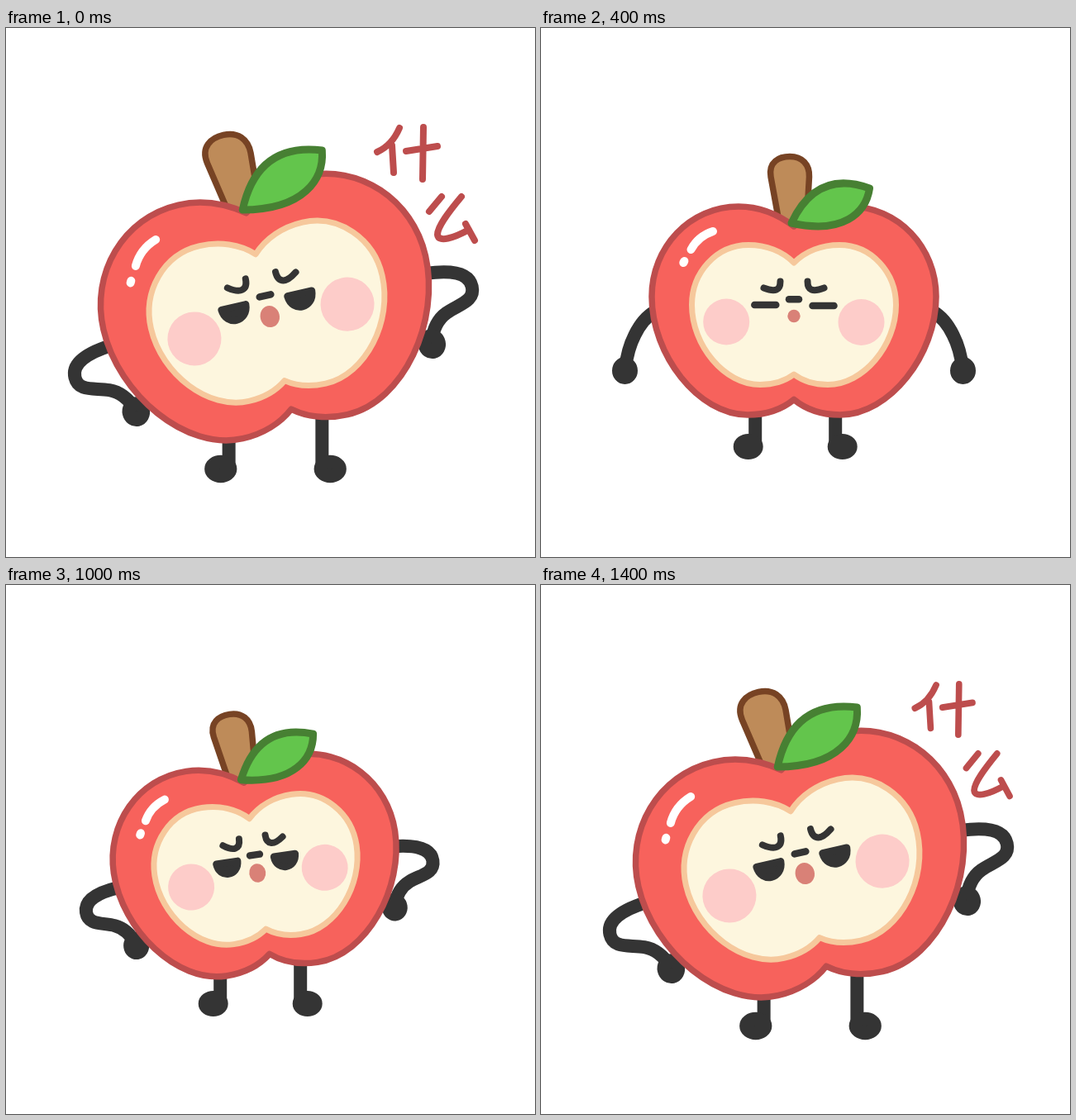
Animation of 640 by 640 pixels, one loop 1600 ms. Source, as an HTML page with a canvas:

```html
<!DOCTYPE html>
<html lang="zh">
<head>
<meta charset="utf-8">
<style>
  html, body { margin: 0; width: 100%; height: 100%; overflow: hidden; background: #fff; }
  canvas { display: block; width: 100vmin; height: 100vmin; }
</style>
</head>
<body>
<canvas id="stage" width="640" height="640"></canvas>
<script>
const ctx = document.getElementById('stage').getContext('2d');
const LOOP = 1600;
const INK = '#343434', RED = '#f7625c', DARK_RED = '#bd4d4d';
const MID = 306, PIVOT_Y = 355.5;

// Body placement (x, y, angle in degrees, scale) and feet placement.
const UPRIGHT = { x: 306, y: 355.5, angle: 0, scale: 1, feetX: 307.7, feetY: 507 };
const TILTED = { ...UPRIGHT, x: 305, y: 353.4, angle: -8.5 };
const BIG = { x: 320.6, y: 354.7, angle: -12.9, scale: 1.162, feetX: 326, feetY: 534 };

const ARM_DOWN = [138,343, 128,348.5, 119.5,359, 113.4,371.5, 107,384, 103.5,398.5, 102,412];
const ARM_HIP = [138,343, 112,345, 94,352, 94,367, 94,383, 112,382, 126,388];
const WRIST = [138,393, 144,403, 148,414];
const BROW_CALM = [269.5,314.5, 276,317, 281,318, 285,316.5, 289,315, 289.5,311, 289.5,306.5];
const BROW_STERN = [269.5,311.5, 275,315.5, 280,318, 284,317, 288,316, 290,312, 290,306.5];

const lerp = (a, b, k) => a + (b - a) * k;
const blend = (a, b, k) => a.map((v, i) => lerp(v, b[i], k));

let unit = 1; // keeps line weights constant while the body scales

function stroke(path, color, width) {
  ctx.strokeStyle = color;
  ctx.lineWidth = width / unit;
  ctx.stroke(path);
}

function paint(path, fill, line, width) {
  ctx.fillStyle = fill;
  ctx.fill(path);
  if (line) stroke(path, line, width);
}

function ellipse(x, y, rx, ry = rx) {
  const p = new Path2D();
  p.ellipse(x, y, rx, ry, 0, 0, Math.PI * 2);
  return p;
}

function curve(pts) {
  const p = new Path2D();
  p.moveTo(pts[0], pts[1]);
  for (let i = 2; i < pts.length; i += 6) p.bezierCurveTo(...pts.slice(i, i + 6));
  return p;
}

// Closed outline from a left half that runs from the top notch to the bottom one.
function symmetric(half) {
  const pairs = [];
  for (let i = 0; i < half.length; i += 2) pairs.unshift([2 * MID - half[i], half[i + 1]]);
  const p = curve([...half, ...pairs.slice(1).flat()]);
  p.closePath();
  return p;
}

function mirrored(draw) {
  draw();
  ctx.save();
  ctx.translate(2 * MID, 0);
  ctx.scale(-1, 1);
  draw();
  ctx.restore();
}

const SKIN = symmetric([306,240, 285,224, 262,216, 239,216, 180,216, 134,265, 134,325,
  134,395, 190,468, 250,468, 272,468, 292,461, 306,449.5]);
const FLESH = symmetric([306,284, 292,270, 272,262.5, 251,262.5, 212,262.5, 182.5,296, 182.5,335,
  182.5,384, 222,431.5, 265,431.5, 280,431.5, 294,428, 306,419]);
const STEM = new Path2D('M289 240L278 180C275 162 288 155.5 301 155.5C316 155.5 325 165 324.5 180L321 240Z');
const LEAF = new Path2D('M303 236C318 204 345 175 397.5 194C393 224 365 250 303 236Z');
const SHINE = new Path2D('M181.5 268Q190 252 208 246M172.3 284L173.4 282');

const SHI = new Path2D('M476 121Q467 142 449 150M467 142L469 175M484 149L522 143M505 120L504 183');
const ME = new Path2D('M527 204L512 222M551 204C536 222 522 240 522 250C523 260 542 254 560 244M556 237L567 257');

function legs(pose) {
  for (const side of [-1, 1]) {
    const legX = pose.feetX + side * 48.5 * pose.scale;
    const footX = pose.feetX + side * 57 * pose.scale;
    const leg = new Path2D();
    leg.moveTo(legX, pose.feetY - 90);
    leg.lineTo(legX, pose.feetY - 4);
    stroke(leg, INK, 16);
    paint(ellipse(footX, pose.feetY - 0.5, 10 * pose.scale, 7.5 * pose.scale), INK, INK, 16);
  }
}

function arms(k) {
  // The hanging arm's lower end is extended so both arms share one point count.
  const down = [...ARM_DOWN, 102,413, 102,414, 101.5,415];
  const arm = curve(blend(down, [...ARM_HIP, ...WRIST], k));
  const hand = ellipse(lerp(101.5, 148, k), lerp(414.5, 416, k), 7.5, 8.5);
  mirrored(() => {
    stroke(arm, INK, 16);
    paint(hand, INK, INK, 16);
  });
}

function eye(x, closedY, openY, k) {
  const y = lerp(closedY, openY, k), depth = 14 * k * 4 / 3;
  const p = curve([x - 13, y, x - 12, y + depth, x + 12, y + depth, x + 13, y]);
  p.closePath();
  paint(p, INK, INK, 8.5);
}

function face(k) {
  const cheek = '#fdccc9';
  paint(ellipse(224.2, 355.5, 28), cheek);
  paint(ellipse(387.5, 356, 28), cheek);
  mirrored(() => stroke(curve(blend(BROW_CALM, BROW_STERN, k)), INK, 8));
  eye(271.3, 335, 332.5, k);
  eye(341.5, 336, 334, k);
  stroke(new Path2D('M300 328.3H312'), INK, 8.5);
  paint(ellipse(306, lerp(348.5, 350.5, k), lerp(7.7, 10, k), lerp(7.7, 11.3, k)), '#d98177');
}

function body(pose, k) {
  ctx.save();
  ctx.translate(pose.x, pose.y);
  ctx.rotate(pose.angle * Math.PI / 180);
  ctx.scale(pose.scale, pose.scale);
  ctx.translate(-MID, -PIVOT_Y);
  unit = pose.scale;
  arms(k);
  paint(STEM, '#be8b59', '#774324', 7.5);
  paint(SKIN, RED, DARK_RED, 7.5);
  paint(FLESH, '#fdf6de', '#f6c89c', 7);
  stroke(SHINE, '#fff', 10);
  paint(LEAF, '#63c54c', '#478033', 9);
  face(k);
  ctx.restore();
  unit = 1;
}

function glyph(path, right, top, squeezed) {
  ctx.save();
  if (squeezed) {
    ctx.translate(right, top);
    ctx.scale(0.955, 0.97);
    ctx.translate(-right, -top);
  }
  stroke(path, DARK_RED, 8);
  ctx.restore();
}

function render(t) {
  const shouting = t < 400 || t >= 1200;
  const pose = shouting ? BIG : t < 1000 ? UPRIGHT : TILTED;
  const rising = t >= 400 && t < 800;
  const k = rising ? Math.floor((t - 400) * 6 / 400) / 6 : 1;

  ctx.fillStyle = '#fff';
  ctx.fillRect(0, 0, 640, 640);
  ctx.lineCap = ctx.lineJoin = 'round';
  legs(pose);
  body(pose, k);
  if (shouting) {
    const squeezed = t % 400 >= 200;
    glyph(SHI, 522, 120, squeezed);
    glyph(ME, 567, 203, squeezed);
  }
}

const start = performance.now();
function tick() {
  render((performance.now() - start) % LOOP);
  requestAnimationFrame(tick);
}
tick();
</script>
</body>
</html>
```
